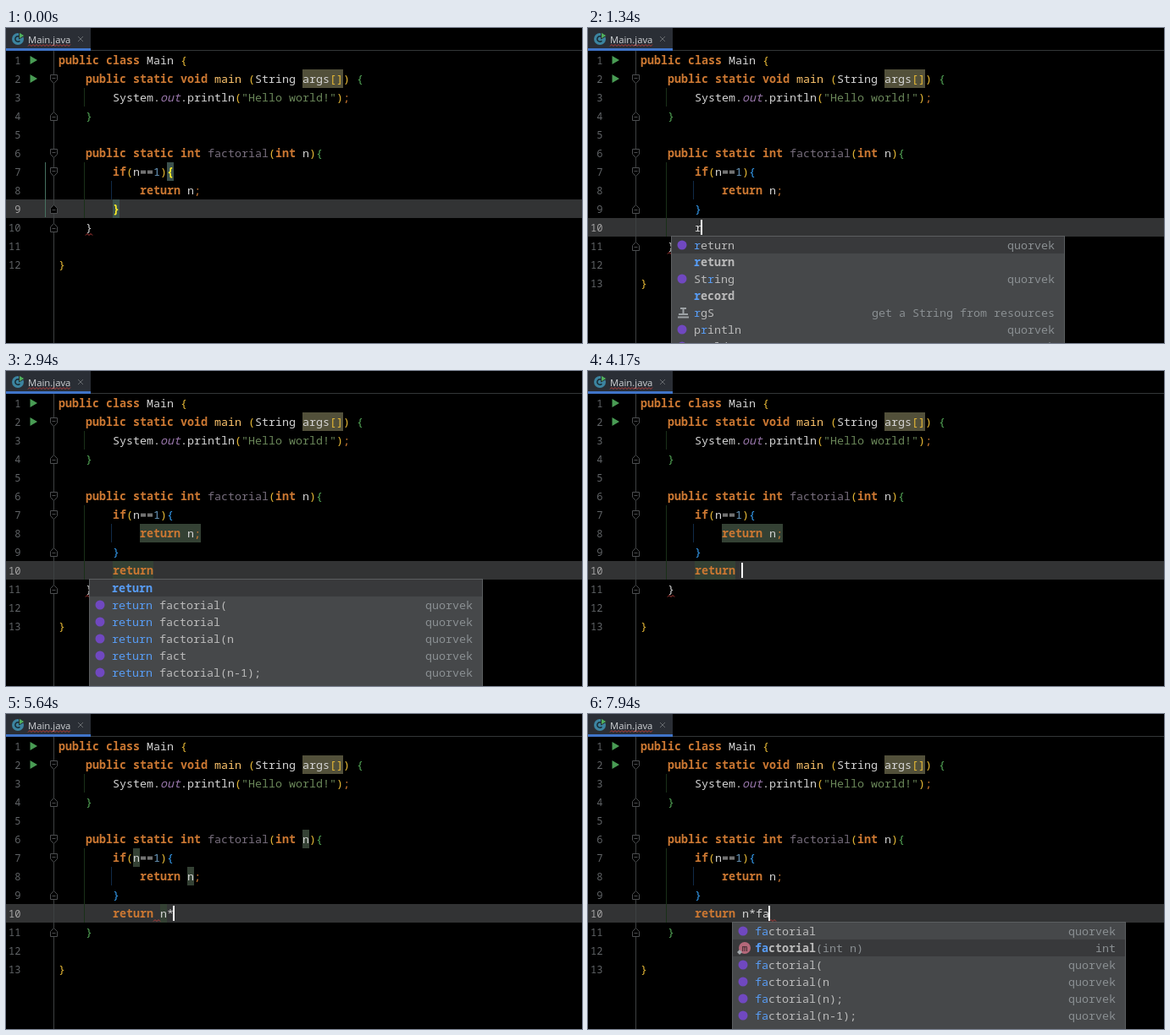
Write an HTML page that moves like this. It is 680 px wide and 373 px high and loops after 8000 ms.

```html
<!DOCTYPE html>
<html lang="en">
<head>
<meta charset="utf-8">
<title>Code editor</title>
<style>
html, body { margin: 0; width: 100%; height: 100%; overflow: hidden; background: #000; }
svg { display: block; width: 100%; height: 100%; }
text { font: 13.333px "Noto Sans Mono", "DejaVu Sans Mono", monospace; white-space: pre; fill: #d5d5d5; }
.kw { fill: #cc7832; font-weight: 600; }
.fn { fill: #ffc66d; }
.dim { fill: #776e7d; }
.it { fill: #9876aa; font-style: italic; }
.str { fill: #6a8759; }
.num { fill: #6897bb; }
.semi { fill: #cc7832; }
.b1, .par { fill: #e8ba36; }
.b2 { fill: #54a857; }
.b3 { fill: #359ff4; }
.b1, .b2, .b3 { font-weight: 500; }
.match { fill: #ffef28; font-weight: 700; }
.no { font-size: 12px; fill: #606366; text-anchor: end; }
.no.now { fill: #a4a3a3; }
.item { fill: #bbbbbb; }
.side { fill: #8a8f92; }
.hit { fill: #589df6; }
.bold { font-weight: 600; }
.tab { font: 11.3px "Open Sans", "Noto Sans", sans-serif; fill: #d0d3d6; }
.wave { fill: none; stroke: #bc3f3c; }
.fold { fill: #000; stroke: #4b4d4f; }
</style>
</head>
<body>
<svg id="stage" viewBox="0 0 680 373" preserveAspectRatio="none">
  <rect width="680" height="373"/>
  <g id="editor"></g>
  <rect y="26" width="680" height="1" fill="#333638"/>
  <rect width="100" height="26" fill="#2a2e35"/>
  <rect y="24" width="100" height="3" fill="#4074c8"/>
  <circle cx="14" cy="13" r="7" fill="#3c84a0"/>
  <path d="M16.4 10.8A3.2 3.2 0 1 0 16.4 15.2" fill="none" stroke="#182a33" stroke-width="1.5"/>
  <path d="M15.500 5L22 9L15.500 13Z" fill="#4fae5c" stroke="#2a2e35"/>
  <text class="tab" x="26" y="18">Main.java</text>
  <path class="wave" id="tabWave"/>
  <path d="M85 10L91 16M91 10L85 16" stroke="#65696d"/>
  <g id="menu"></g>
</svg>
<script>
const LOOP = 8000, CH = 8, LEFT = 62, ROW = 22, HELPER = 'quorvek';
const colX = c => LEFT + c * CH;
const lineY = n => 27 + (n - 1) * ROW;
const esc = s => s.replace(/&/g, '&amp;').replace(/</g, '&lt;');
const rect = (x, y, w, h, fill) => `<rect x="${x}" y="${y}" width="${w}" height="${h}" fill="${fill}"/>`;
const text = (x, y, cls, s) => `<text x="${x}" y="${y}" class="${cls}">${esc(s)}</text>`;

function wave(x, y, w) {
  let d = `M${x} ${y + 2.5}`;
  for (let i = 2; i <= w; i += 2) d += `L${x + i} ${y + (i % 4 ? 0.5 : 2.5)}`;
  return d;
}

// Tokens are "class:text", joined by "|"
function code(n, col, tokens) {
  return tokens.split('|').map(tok => {
    const cut = tok.indexOf(':');
    const s = tok.slice(cut + 1);
    const out = text(colX(col), lineY(n) + 16, tok.slice(0, cut), s);
    col += s.length;
    return out;
  }).join('');
}

const box = (n, col, len, fill) => rect(colX(col), lineY(n), len * CH, ROW, fill);
const guide = (col, from, to, fill) => rect(colX(col) - 2, lineY(from), 1, (to - from + 1) * ROW, fill);

function fold(n, dir) {
  const y = lineY(n) + 11.5;
  return `<path class="fold" d="M52.500 ${y - 5 * dir}H60.500V${y + dir}L56.500 ${y + 5 * dir}L52.500 ${y + dir}ZM54.500 ${y - dir}H58.500"/>`;
}

// Menu rows: kind, label, side note
const ai = (...names) => names.map(s => ['ai', s, HELPER]);
const kw = s => ['kw', s, ''];
const method = ['m', 'factorial(int n)', 'int'];
const menus = {
  r: { col: 8, rows: [...ai('return'), kw('return'), ...ai('String'), kw('record'),
    ['tpl', 'rgS', 'get a String from resources'], ...ai('println', 'world')] },
  re: { col: 8, rows: [...ai('return'), kw('return'),
    ...ai('return factorial(', 'return factorial', 'return factorial(n', 'return fact')] },
  ret: { col: 8, rows: [kw('return'), ...ai('return factorial(', 'return factorial',
    'return factorial(n', 'return fact', 'return factorial(n-1);')] },
  n: { col: 15, rows: [...ai('n'), ['p', 'n', 'int'], kw('null'), kw('new'), ...ai('println', 'int')] },
  f: { col: 17, rows: [...ai('factorial'), method, ...ai('fact', 'for', 'false', 'final', 'float')] },
  fa: { col: 17, rows: [...ai('factorial'), method,
    ...ai('factorial(', 'factorial(n', 'factorial(n);', 'factorial(n-1);')] }
};

function icon(kind, x, y) {
  if (kind === 'ai') return `<circle cx="${x}" cy="${y}" r="5.500" fill="#7048c0"/>`;
  if (kind === 'tpl') return `<path d="M${x - 2} ${y - 5}H${x + 5}M${x + 1.5} ${y - 5}V${y + 2}M${x - 4} ${y + 2}H${x + 7}M${x - 5} ${y + 5.5}H${x + 8}" stroke="#9da2a5" stroke-width="2"/>`;
  if (kind === 'm' || kind === 'p') return `<circle cx="${x + 2}" cy="${y}" r="7" fill="#b5687a"/>` +
    `<text x="${x + 2}" y="${y + 3.5}" text-anchor="middle" style="font-size:11px;fill:#2b2224">${kind}</text>` +
    (kind === 'm' ? `<path d="M${x - 4} ${y + 2}l3 3l-3 3l-3-3Z" fill="#a3a8ab"/>` : '');
  return '';
}

function menuSvg(s) {
  if (!s.menu) return '';
  const { col, rows } = menus[s.menu];
  const x = colX(col) - 28, top = lineY(11), tx = x + 27;
  const prefix = s.typed.slice(col - 8);
  let out = rect(x, top - 1, 465, 140, '#5b5e60') + rect(x + 1, top, 463, 140, '#46484a') +
    rect(x + 1, top + s.sel * 20, 463, 20, '#38393b');
  rows.forEach(([kind, label, side], i) => {
    const mid = top + 10 + i * 20, y = mid + 5;
    const bold = kind === 'kw' || kind === 'm' ? ' bold' : '';
    const at = Math.max(0, label.indexOf(prefix)), end = at + prefix.length;
    const paren = kind === 'm' ? label.indexOf('(') : label.length;
    const part = (a, b, cls) => a < b ? text(tx + a * CH, y, cls, label.slice(a, b)) : '';
    out += icon(kind, x + 13, mid) + part(0, at, 'item' + bold) + part(at, end, 'hit' + bold) +
      part(end, paren, 'item' + bold) + part(paren, label.length, 'side') +
      text(x + 453 - side.length * CH, y, 'side', side);
  });
  return out;
}

function editorSvg(s) {
  const now = s.open ? 10 : 9, close = s.open ? 11 : 10, total = close + 2;
  const used = '#344134', pair = '#3b514d';
  let out = rect(0, lineY(now), 680, ROW, '#323334') + rect(56, 27, 1, 346, '#3d4042');
  out += guide(4, 3, 3, '#1a3018') + guide(4, 7, close - 1, '#1a3018') + guide(8, 8, 8, '#102a48');
  for (let n = 1; n <= total; n++) out += text(17.5, lineY(n) + 16, n === now ? 'no now' : 'no', String(n));
  for (const n of [1, 2]) out += `<path d="M28.500 ${lineY(n) + 6}L37 ${lineY(n) + 11}L28.500 ${lineY(n) + 16}Z" fill="#499c54"/>`;
  for (const [n, d] of [[2, 1], [4, -1], [6, 1], [7, 1], [9, -1], [close, -1]]) out += fold(n, d);

  out += box(2, 36, 6, '#52503a');
  if (!s.open) out += rect(46, lineY(7), 1, 3 * ROW - 1, '#46705f') + box(7, 16, 1, pair) + box(9, 8, 1, pair);
  if (s.exits) out += box(8, 12, 9, used) + box(10, 8, 6, used);
  if (s.vars) out += box(6, 36, 1, used) + box(7, 11, 1, used) + box(8, 19, 1, used) + box(10, 15, 1, used);

  const inner = s.open ? 'b3' : 'match';
  out += code(1, 0, 'kw:public class| : |t:Main |b1:{') +
    code(2, 4, 'kw:public static void |fn:main |par:(|t:String args|par:[])| : |b2:{') +
    code(3, 8, 't:System.|it:out|t:.println|par:(|str:"Hello world!"|par:)|semi:;') +
    code(4, 4, 'b2:}') +
    code(6, 4, 'kw:public static int |dim:factorial|par:(|kw:int |t:n|par:)|b2:{') +
    code(7, 8, `kw:if|par:(|t:n==|num:1|par:)|${inner}:{`) +
    code(8, 12, 'kw:return |t:n|semi:;') +
    code(9, 8, inner + ':}') +
    code(close, 4, (s.err === 'brace' ? 't' : 'b2') + ':}') +
    code(total, 0, 'b1:}');

  if (s.typed) {
    const word = s.typed.startsWith('return') ? 6 : 0;
    out += code(10, 8, `kw:${s.typed.slice(0, word)}|t:${s.typed.slice(word)}`);
  }
  const [ex, en] = s.err === 'brace' ? [4, close] : [s.err, 10];
  out += `<path class="wave" d="${wave(colX(ex), lineY(en) + 18, 8)}"/>`;
  if (s.caret) out += rect(colX(s.open ? 8 + s.typed.length : 9) - 1, lineY(now) + 2, 2, 18, '#fff');
  return out;
}

// Each step changes only the listed fields
const steps = [
  [0, { open: false, typed: '', caret: false, menu: '', sel: 0, exits: false, vars: false, err: 'brace' }],
  [500, { caret: true }],
  [600, { open: true }],
  [1270, { typed: 'r' }],
  [1340, { menu: 'r' }],
  [1480, { typed: 're', menu: 're' }],
  [1750, { typed: 'return', caret: false }],
  [1890, { caret: true, exits: true }],
  [2050, { menu: 'ret' }],
  [2940, { caret: false }],
  [3440, { caret: true }],
  [3940, { caret: false }],
  [4170, { typed: 'return ', caret: true, menu: '' }],
  [4200, { exits: false }],
  [4500, { err: 14 }],
  [4970, { typed: 'return n' }],
  [5040, { menu: 'n', vars: true }],
  [5640, { typed: 'return n*', menu: '' }],
  [5680, { vars: false }],
  [5990, { err: 17 }],
  [6490, { caret: false }],
  [6560, { typed: 'return n*f', caret: true, err: 18 }],
  [6620, { menu: 'f' }],
  [6790, { typed: 'return n*fa', err: 19 }],
  [6960, { menu: 'fa' }],
  [7430, { caret: false }],
  [7870, { sel: 1 }],
  [7940, { caret: true }]
];
const states = [];
steps.forEach(([, change], i) => states.push({ ...states[i - 1], ...change }));

const editor = document.getElementById('editor');
const menu = document.getElementById('menu');
document.getElementById('tabWave').setAttribute('d', wave(26, 19, 50));
let shown = -1;

function draw() {
  const t = performance.now() % LOOP;
  let i = steps.length - 1;
  while (steps[i][0] > t) i--;
  if (i !== shown) {
    shown = i;
    editor.innerHTML = editorSvg(states[i]);
    menu.innerHTML = menuSvg(states[i]);
  }
  requestAnimationFrame(draw);
}
draw();
</script>
</body>
</html>
```
